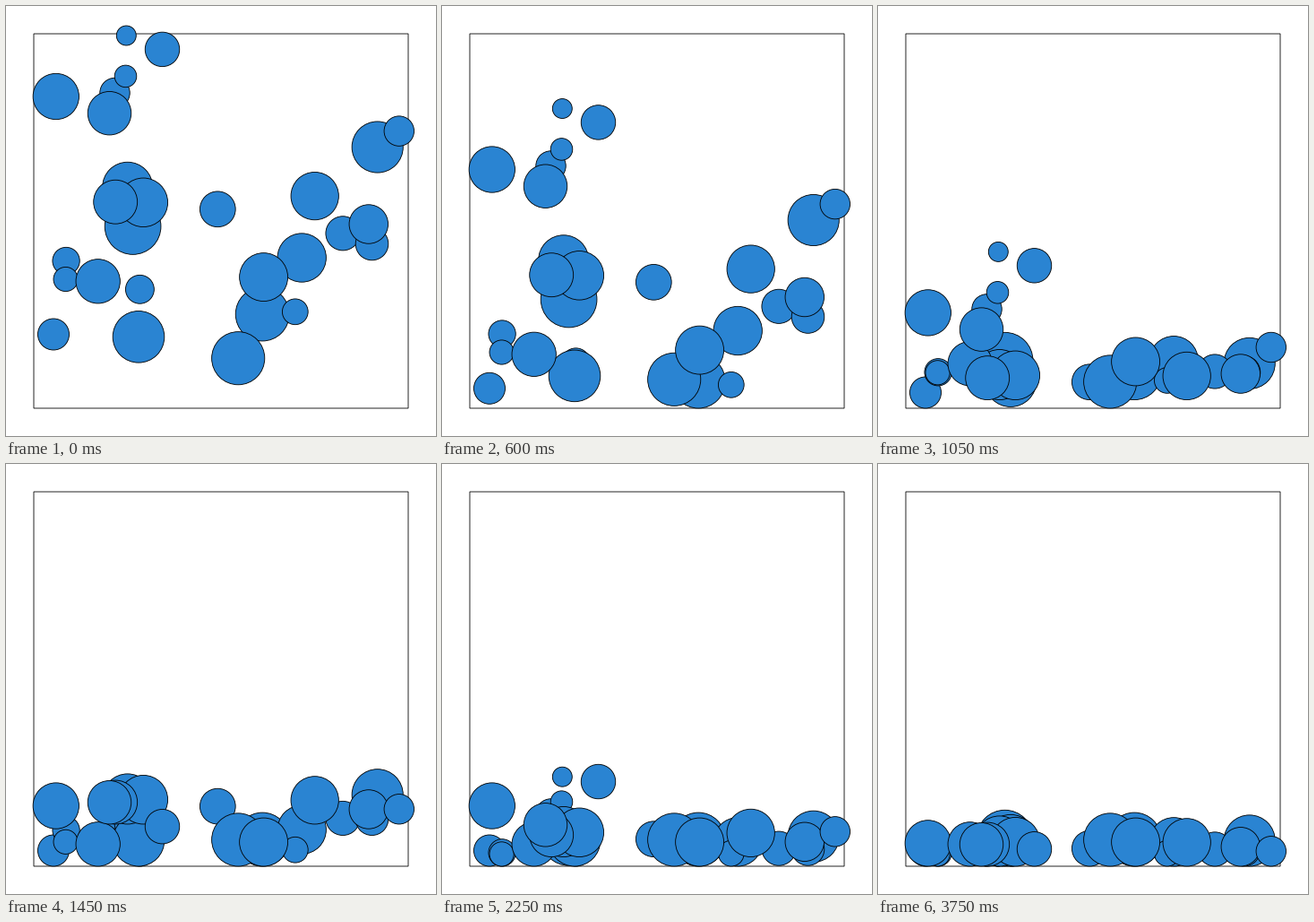
A matplotlib script that plays this animation: 480x480 px, repeating every 5050 ms.

```python
import matplotlib.pyplot as plt
import numpy as np
from matplotlib.animation import FuncAnimation
from matplotlib.patches import Circle, Rectangle

STAGE, DPI = 480, 100
FRAMES, INTERVAL = 101, 50
EDGE, SIDE = 31, 418
UNIT = SIDE / 400            # pixels per world unit
GRAVITY, BOUNCE = 1.0, 0.5
START_SPEED = 1e-4           # tiny push that settles exact floor contacts
LINE = 0.85 * 72 / DPI
BLUE = "#2a84d2"

# Starting centres, back to front: two runs, each from large to small.
STARTS = [
    (141.6, 246.0), (286.2, 344.0), (414.7, 157.5), (330.2, 281.0),
    (236.3, 226.8), (376.0, 253.8), (408.5, 265.5), (53.0, 366.5),
    (121.5, 97.0), (149.4, 316.3), (67.1, 284.5), (322.8, 341.3),
    (66.6, 305.0), (133.5, 78.4), (134.3, 33.0),

    (259.2, 393.2), (148.0, 369.3), (135.7, 202.3), (153.3, 219.3),
    (287.6, 302.6), (344.7, 212.1), (55.8, 101.0), (102.7, 307.3),
    (122.2, 218.7), (115.5, 119.7), (404.8, 243.5), (174.5, 48.4),
    (438.8, 139.6),
]


def radius(index):
    """Ball size in pixels, shrinking along each run."""
    return UNIT * np.interp(
        index,
        [0, 3, 4, 12, 14, 15, 18, 20, 22, 24, 27],
        [30, 26, 19, 13, 10.5, 28.3, 26.1, 25.5, 23.6, 23.2, 16])


def fall(y, r):
    """Heights of one ball for every frame."""
    floor = EDGE + SIDE - r
    speed, path = START_SPEED, []
    for _ in range(FRAMES):
        path.append(y)
        speed += GRAVITY
        y += speed * UNIT
        if y > floor:
            y, speed = floor, -speed * BOUNCE
    return path


fig = plt.figure(figsize=(STAGE / DPI, STAGE / DPI), dpi=DPI, facecolor="white")
ax = fig.add_axes([0, 0, 1, 1])
ax.set(xlim=(0, STAGE), ylim=(STAGE, 0))
ax.axis("off")
ax.add_patch(Rectangle((EDGE, EDGE), SIDE, SIDE, fill=False, ec="black",
                       lw=LINE, snap=False, zorder=1))

circles, paths = [], []
for i, (x, y) in enumerate(STARTS):
    r = radius(i)
    paths.append(fall(y, r))
    circles.append(ax.add_patch(
        Circle((x, y), r, fc=BLUE, ec="black", lw=LINE, zorder=2 + i)))


def update(frame):
    for circle, (x, _), path in zip(circles, STARTS, paths):
        circle.center = x, path[frame]
    return circles


animation = FuncAnimation(fig, update, frames=FRAMES, interval=INTERVAL,
                          repeat=True, repeat_delay=0)
plt.show()
```
